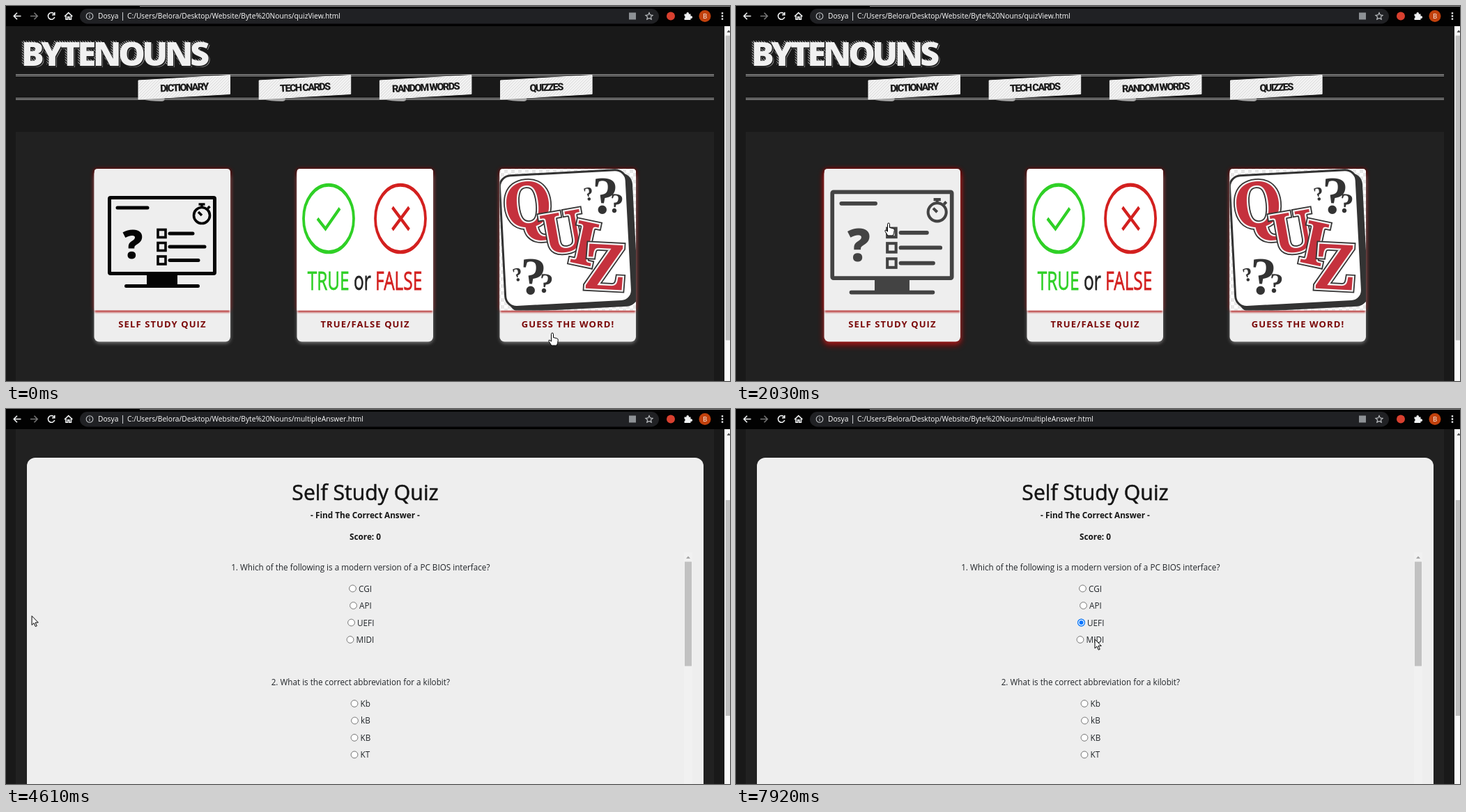
An HTML page that plays this animation: 1039x539 px, repeating every 8000 ms.

```html
<!DOCTYPE html>
<html lang="en">
<head>
<meta charset="utf-8">
<title>Quiz page</title>
<style>
html, body { margin: 0; width: 100%; height: 100%; overflow: hidden; background: #191919; }
svg { display: block; width: 100vw; height: 100vh; font-family: "Open Sans", "Noto Sans", sans-serif; }
.bar { font-size: 10.23px; fill: #fff; }
.logo { font-size: 48.5px; font-weight: 800; letter-spacing: -4.2px; }
.nav { font: 900 14.5px Roboto, sans-serif; letter-spacing: -1.65px; text-anchor: middle; fill: #1c1c1c; }
.label { font-size: 13px; font-weight: 700; letter-spacing: 1.1px; text-anchor: middle; fill: #7a0808; }
.mid { text-anchor: middle; fill: #151515; }
.h1 { font-size: 30.2px; stroke: #151515; stroke-width: .5px; }
.b { font-size: 11.75px; font-weight: 700; }
.q { font-size: 11.7px; fill: #212529; }
.letter { font-family: "Noto Serif", "DejaVu Serif", serif; font-weight: 700; text-anchor: middle; }
.mark { font-family: "Liberation Serif", serif; font-weight: 700; text-anchor: middle; fill: #333; }
</style>
</head>
<body>
<svg viewBox="0 0 1039 539" preserveAspectRatio="none">
  <defs>
    <pattern id="hatch" width="2.6" height="2.6" patternUnits="userSpaceOnUse" patternTransform="rotate(-45)">
      <path d="M0 0V2.6" stroke="#ddd" stroke-width="1.5"/>
    </pattern>
    <pattern id="paper" width="3" height="3" patternUnits="userSpaceOnUse" patternTransform="rotate(45)">
      <rect width="3" height="3" fill="#f5f5f5"/><path d="M0 0V3" stroke="#d2d2d2" stroke-width="1.4"/>
    </pattern>
    <pattern id="checks" width="10" height="10" patternUnits="userSpaceOnUse">
      <rect width="10" height="10" fill="#fff"/><path d="M0 0h5v10h5V5H0z" fill="#e8e8e8"/>
    </pattern>
    <filter id="soft" x="-20%" y="-20%" width="140%" height="140%"><feGaussianBlur stdDeviation="2.5"/></filter>
    <filter id="wide" x="-20%" y="-20%" width="140%" height="140%"><feGaussianBlur stdDeviation="4.5"/></filter>
    <filter id="shade" filterUnits="userSpaceOnUse" x="0" y="425" width="1039" height="30"><feGaussianBlur stdDeviation="1.3"/></filter>
    <clipPath id="list"><rect x="30" y="359" width="971" height="400"/></clipPath>
  </defs>
  <rect width="1039" height="539" fill="#191919"/>
  <g id="page">
    <g id="head"></g>
    <rect x="14" y="181" width="1002" height="900" fill="#212121"/>
    <g id="menu"></g>
    <g id="quiz">
      <rect x="30" y="223" width="971" height="900" rx="12" fill="#eee"/>
      <g class="mid">
        <text class="h1" x="515.5" y="284">Self Study Quiz</text>
        <text class="b" x="515.5" y="310">- Find The Correct Answer -</text>
        <text class="b" x="515.5" y="340.5">Score: 0</text>
      </g>
      <g clip-path="url(#list)">
        <g id="items"></g>
        <rect x="973" y="359" width="12" height="400" fill="#f1f1f1"/>
        <path id="up" d="M976 368h6l-3-3.4z"/>
        <rect id="innerThumb" x="974" y="372.5" width="10" height="150" fill="#c1c1c1"/>
      </g>
    </g>
  </g>
  <rect x="1031" y="29" width="8" height="510" fill="#f8f8f8"/>
  <path d="M1034.5 38h4.5v-1.5l-2-2z" fill="#555"/>
  <rect id="thumb" x="1032.5" width="7" fill="#c1c1c1"/>
  <g id="toolbar">
    <rect width="1039" height="29" fill="#020202"/>
    <rect x="192" width="847" height="1" fill="#8a8a8a"/>
    <rect x="106" y="4" width="831" height="21.5" rx="10.7" fill="#202124"/>
    <g fill="none" stroke="#f1f3f4" stroke-width="1.6">
      <path d="M21.5 14.5H11.5M16 9.8l-4.7 4.7 4.7 4.7"/>
      <path d="M35 14.5h10M40.5 9.8l4.7 4.7-4.7 4.7" stroke="#777"/>
      <path id="reload" d="M69.2 11.6A4.8 4.8 0 1 0 69.8 16M69.8 9v3.8H66"/>
      <path id="stop" d="M61 10.3l8.4 8.4m0-8.4L61 18.7"/>
      <path d="M84 15l5.7-5.3 5.7 5.3M86 14v5.3h2.6v-3.6h2.2v3.6h2.6V14"/>
      <g stroke="#c4c7ca" stroke-width="1.1">
        <circle cx="120" cy="14.5" r="4.8"/><path d="M120 13.7v3.6M120 11.4v1.2M167.5 9v12"/>
        <path d="M923 9.6l1.5 3.3 3.6.4-2.7 2.4.8 3.5-3.2-1.8-3.2 1.8.8-3.5-2.7-2.4 3.6-.4z"/>
      </g>
    </g>
    <text class="bar" x="132" y="18.3">Dosya</text>
    <text class="bar" id="address" x="174" y="18.3"></text>
    <rect id="translate" x="894" y="9.5" width="10" height="10" fill="#8d9195"/>
    <circle cx="954" cy="14.5" r="6" fill="#d8402f"/>
    <path d="M973.5 11.5h3a1.8 1.8 0 1 1 3.4 0h2.6v3a1.8 1.8 0 1 1 0 3.2v2.3h-9v-2.5a1.8 1.8 0 0 0 0-3.4z" fill="#f1f3f4"/>
    <circle cx="1003" cy="14.5" r="8.5" fill="#c2410c"/>
    <text x="1003" y="18" font-size="9.5" fill="#fff" text-anchor="middle">B</text>
    <path d="M1028 9.2v2.4m0 1.7v2.4m0 1.7v2.4" stroke="#f1f3f4" stroke-width="2.4"/>
  </g>
  <g id="cursor" fill="#fff" stroke="#000" stroke-linejoin="round">
    <path id="arrow" d="M0 0V13l3-2.8 2.2 5 2-.9-2.2-4.8h4.2z"/>
    <path id="hand" d="M-1.5 9V1.5a1.5 1.5 0 0 1 3 0V6.5l5 1.2q2 .5 1.8 2.5l-.7 4.3-1.3 3.5H-1.2L-5 11.8q-.6-1.6 1-1.7l2.5 2z"/>
  </g>
</svg>
<script>
const LOOP = 8000, CLICK = 2570, SWITCH = 3160, PICK = 7450;
const FOLDER = 'C:/Users/Belora/Desktop/Website/Byte%20Nouns/';
const $ = id => document.getElementById(id);
const clamp = v => Math.max(0, Math.min(1, v));
const show = (id, on) => $(id).setAttribute('display', on ? 'inline' : 'none');
const smooth = (t, a, b) => { const u = clamp((t - a) / (b - a)); return u * u * (3 - 2 * u); };

// the CSS "ease" curve
function ease(x) {
  x = clamp(x);
  let lo = 0, hi = 1;
  for (let i = 0; i < 18; i++) {
    const u = (lo + hi) / 2;
    if (.75 * u * (1 - u) + u ** 3 < x) lo = u; else hi = u;
  }
  return .3 * lo * (1 - lo) ** 2 + 3 * lo * lo * (1 - lo) + lo ** 3;
}

// header
const logo = (dx, dy, look) => `<text class="logo" x="${22 + dx}" y="${86 + dy}" ${look}>BYTENOUNS</text>`;
const rule = y => `<path d="M14 ${y}h1002m0 2h-1002" stroke="#b4b4b4" stroke-width=".9"/>`;
const tabs = ['DICTIONARY', 'TECH CARDS', 'RANDOM WORDS', 'QUIZZES'];
$('head').innerHTML =
  logo(-3, -2.5, 'fill="url(#hatch)"') + logo(2, 2, 'fill="#8a8a8a"') +
  logo(.5, .5, 'fill="#191919" stroke="#191919" stroke-width="1.5"') + logo(0, 0, 'fill="#f0f0f0"') +
  rule(98.5) + rule(132.5) +
  tabs.map((name, i) => `<g id="tab${i}">
    <path d="M5 134l33-2.5v3.5q-1 2-5 2-16 0-28-3z" fill="#a5a5a5"/>
    <path d="M.5 107L132 99.5V126.5L.5 134z" fill="url(#paper)" stroke="#f4f4f4"/>
    <text class="nav" transform="translate(66 117) rotate(-2.5)" y="5">${name}</text></g>`).join('');

// quiz menu pictures, each in page coordinates
const monitor = `<g fill="none" stroke="#050505" stroke-width="5">
    <rect x="148.5" y="275.5" width="151" height="109" rx="1.5"/>
    <path d="M160 290h43M172.5 402.5h103M235 327h33M235 346h50M235 365.5h41" stroke-linecap="round"/>
    <path d="M202 394h44" stroke-width="18"/>
    <g stroke-width="3.6">${[327, 346, 365.5].map(y => `<rect x="218" y="${y - 5.5}" width="11" height="11"/>`).join('')}
      <circle cx="281" cy="301" r="11.5"/><path d="M276.5 285h9M281 285v5M289.5 291l3-3M281 301l-5-5"/></g>
  </g>
  <text x="182" y="363" font-size="57" font-weight="800" text-anchor="middle" fill="#050505">?</text>`;

const trueFalse = `<rect x="417" y="234" width="197" height="204" fill="#fff"/>
  <g transform="translate(515 305.5) scale(1 1.34)" fill="none" stroke-width="3.8">
    <g stroke="#2fd026"><circle cx="-52" r="36"/><path d="M-68 0l11.5 11L-36 -11"/></g>
    <g stroke="#d3201f"><circle cx="51" r="36"/><path d="M39.5 -12l24 24m0-24l-24 24"/></g>
  </g>
  <g transform="translate(515 408) scale(1 1.5)" font-size="24.4" text-anchor="middle" stroke-width=".5">
    <text fill="#222"><tspan fill="#2fd026" stroke="#2fd026">TRUE</tspan> <tspan
      stroke="#222">or</tspan> <tspan fill="#d3201f" stroke="#d3201f">FALSE</tspan></text>
  </g>`;

// letters carry a dark rim and a white line around the red face
const letter = (c, x, y, size, turn) => ['stroke="#333" stroke-width="8"', 'stroke="#f4f4f4" stroke-width="4.5"', '']
  .map(rim => `<text class="letter" transform="translate(${x} ${y}) rotate(${turn})"
    font-size="${size}" fill="#c5313d" ${rim}>${c}</text>`).join('');
const mark = (x, y, size, turn) =>
  `<text class="mark" transform="translate(${x} ${y}) rotate(${turn})" font-size="${size}">?</text>`;
const tile = `<rect x="708" y="234" width="197" height="204" fill="url(#checks)"/>
  <g transform="rotate(-3 806 335)">
    <rect x="717" y="244" width="186" height="192" rx="17" fill="#333"/>
    <rect x="712.5" y="239.5" width="182" height="189" rx="16" fill="#fff" stroke="#333" stroke-width="3"/>
  </g>` +
  mark(858, 298, 76, 3) + mark(838, 279, 28, -12) + mark(874, 297, 40, 8) +
  mark(755, 414, 76, 3) + mark(736, 395, 28, -12) + mark(773, 412, 40, 8) +
  letter('Q', 752, 317, 90, -6) + letter('U', 804, 353, 80, -10) +
  letter('I', 824, 371, 86, 12) + letter('Z', 858, 407, 90, 3);

// hover runs from "on" to "off"
const cards = [
  { x: 126.5, art: monitor, name: 'SELF STUDY QUIZ', on: 1400, off: SWITCH },
  { x: 417.5, art: trueFalse, name: 'TRUE/FALSE QUIZ', on: 560, off: 1160 },
  { x: 708.5, art: tile, name: 'GUESS THE WORD!', on: 203, off: 343 }
];
const box = (x, y, w, h, look) => `<rect x="${x}" y="${y}" width="${w}" height="${h}" ${look}/>`;
$('menu').innerHTML = cards.map(({ x, art, name }, i) =>
  `<clipPath id="frame${i}"><path d="M${x} 437.5V239q0-5 5-5h185.5q5 0 5 5v198.5z"/></clipPath>` +
  box(x - 1.5, 233, 198.5, 206, 'rx="6" fill="#8a0000" opacity=".7" filter="url(#soft)"') +
  box(x, 240, 196, 245, 'rx="8" fill="#888" opacity=".75" filter="url(#soft)"') +
  box(x - 1, 236, 198, 252, `id="glow${i}" rx="8" fill="#960000" filter="url(#wide)"`) +
  box(x, 234, 195.5, 248.5, 'rx="7" fill="#eee"') +
  `<path d="M${x + 1} 438h193.5" stroke="#b01818" stroke-width="5" filter="url(#shade)" opacity=".75"/>
   <g clip-path="url(#frame${i})">${box(x, 234, 196, 204, 'fill="#eee"')}<g id="art${i}">${art}</g></g>
   <text class="label" x="${x + 98}" y="461.5">${name}</text>`).join('');

// questions: text, then [label, radio centre] pairs
const questions = [
  ['1. Which of the following is a modern version of a PC BIOS interface?', ['CGI', 497.5], ['API', 498.5], ['UEFI', 495.5], ['MIDI', 494]],
  ['2. What is the correct abbreviation for a kilobit?', ['Kb', 500], ['kB', 500.5], ['KB', 500], ['KT', 500]],
  ['3. What type of malware asks you to pay a fee to access files on your computer?', ['Ransomware', 474], ['Spyware', 484]]
];
$('items').innerHTML = questions.map(([text, ...options], n) => {
  const y = 381 + n * 165.4;
  return `<text class="q" text-anchor="middle" x="508.8" y="${y + 4}">${text}</text>` +
    options.map(([label, x], i) => {
      const oy = y + 30.3 + i * 24.5;
      return `<circle cx="${x}" cy="${oy - .3}" r="4.9" fill="#fff" stroke="#767676"/>
        <text class="q" x="${x + 8.6}" y="${oy + 4.2}">${label}</text>`;
    }).join('');
}).join('') + `<g id="picked"><circle cx="495.5" cy="460" r="4.9" fill="#fff" stroke="#0075ff" stroke-width="1.2"/>
  <circle cx="495.5" cy="460" r="3" fill="#0075ff"/></g>`;

// pointer: time, x, y
const path = [
  [0, 784, 470], [70, 784, 470], [250, 740, 425], [400, 690, 395], [560, 613, 350], [860, 520, 320],
  [1160, 418, 312], [1400, 322, 305], [1550, 217, 299], [1720, 208, 298], [2230, 226, 321], [2600, 232, 329],
  [3340, 232, 329], [3600, 262, 332], [3960, 1, 298], [4300, 8, 298], [4600, 29, 296], [5200, 470, 375],
  [5410, 522, 364], [5760, 679, 344], [6620, 679, 344], [7160, 507, 318], [7400, 496, 299], [7580, 494, 297],
  [7780, 494, 297], [7920, 515, 331], [LOOP, 515, 331]
];
function pointer(t) {
  const i = path.findIndex(p => p[0] > t), [a, ax, ay] = path[i - 1], [b, bx, by] = path[i];
  const u = (t - a) / (b - a);
  return [ax + (bx - ax) * u, ay + (by - ay) * u];
}

function hover(t, { on, off }) {
  const rise = ease((Math.min(t, off) - on) / 1000);
  return t < off ? rise : rise * (1 - ease((t - off) / 1000));
}

function render(t) {
  const second = t >= SWITCH, loading = t >= CLICK && !second;
  const scroll = 153 * smooth(t, 4020, 4530);
  const inner = 76.6 * (smooth(t, 5930, 6140) - smooth(t, 6450, 6660));

  $('page').setAttribute('transform', `translate(0 ${-scroll})`);
  show('menu', !second);
  show('quiz', second);
  tabs.forEach((_, i) => {
    const shift = second ? (i - 1.5) * 1.15 : 0;
    $('tab' + i).setAttribute('transform', `translate(${189.5 + i * 173.2 + shift} 0)`);
  });
  cards.forEach((card, i) => {
    const p = hover(t, card), cx = card.x + 97.75;
    $('art' + i).setAttribute('transform', `translate(${cx} 335.5) scale(${1 + .15 * p}) translate(${-cx} -335.5)`);
    $('art' + i).setAttribute('opacity', 1 - .3 * p);
    $('glow' + i).setAttribute('opacity', p);
  });

  $('items').setAttribute('transform', `translate(0 ${-inner})`);
  $('innerThumb').setAttribute('y', 372.5 + inner * .38);
  $('up').setAttribute('fill', inner > .5 ? '#333' : '#a3a3a3');
  show('picked', t >= PICK);
  $('thumb').setAttribute('y', 42.5 + scroll * .578);
  $('thumb').setAttribute('height', second ? 310 : 438);

  show('reload', !loading);
  show('stop', loading);
  show('translate', !loading);
  $('address').textContent = FOLDER + (t < CLICK ? 'quizView.html' : 'multipleAnswer.html');

  const [x, y] = pointer(t);
  const onCard = !second && y > 234 && y < 483 && cards.some(c => x >= c.x && x <= c.x + 195.5);
  $('cursor').setAttribute('transform', `translate(${x} ${y})`);
  show('hand', onCard);
  show('arrow', !onCard);
}

const start = performance.now();
(function frame() {
  render((performance.now() - start) % LOOP);
  requestAnimationFrame(frame);
})();
</script>
</body>
</html>
```
